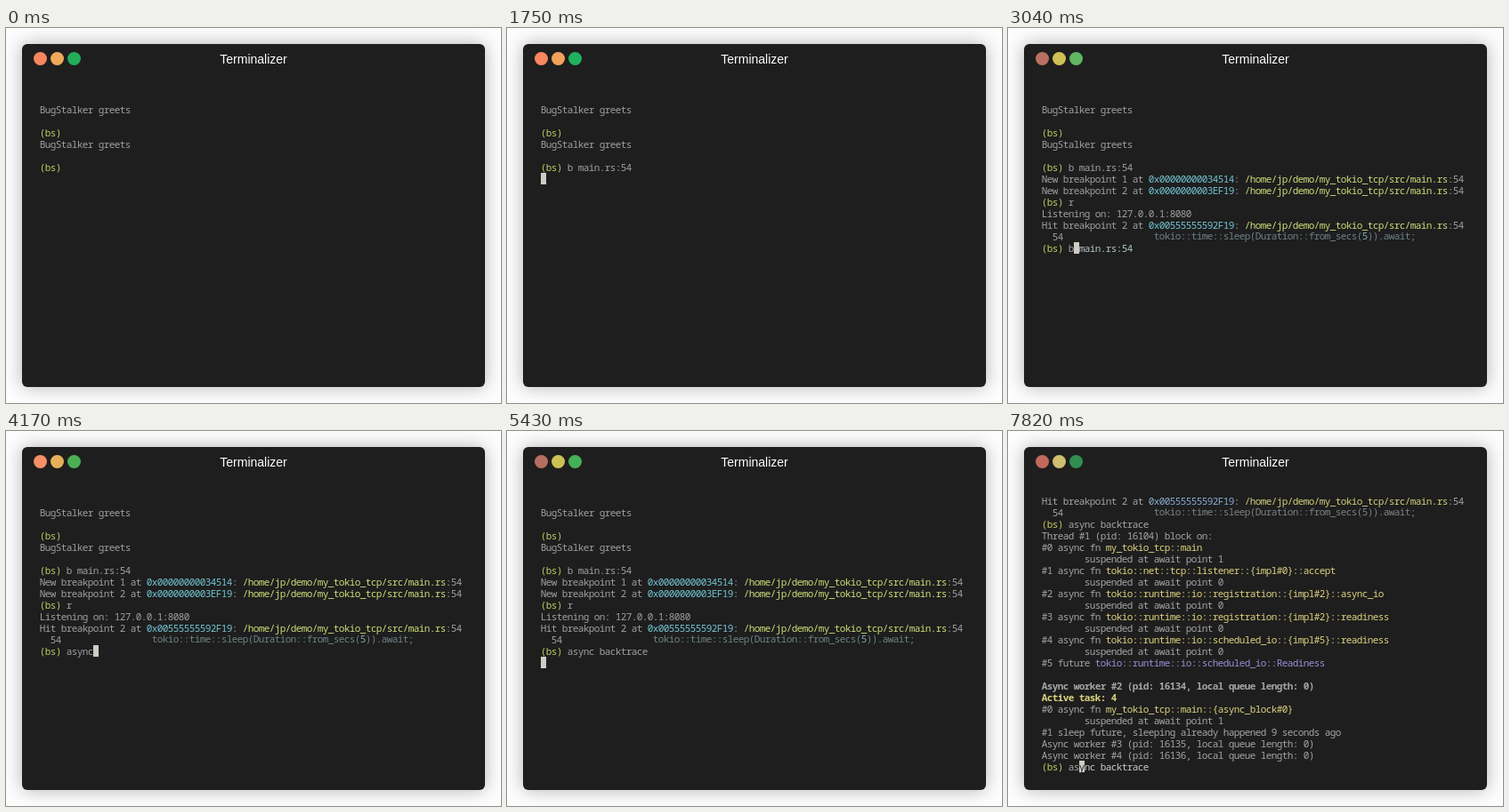
These frames come from a looping animation (556x422 px, 8000 ms). An HTML page with a canvas:

```html
<!DOCTYPE html>
<html lang="en">
<head>
<meta charset="utf-8">
<title>Terminal session</title>
<style>
html, body { margin: 0; width: 100%; height: 100%; overflow: hidden; background: #fdfdfd; }
canvas { display: block; }
</style>
</head>
<body>
<canvas id="stage" width="556" height="422"></canvas>
<script>
const ctx = document.getElementById('stage').getContext('2d');
const LOOP = 8000;
const LEFT = 38, TOP = 72, CELL = 6, LINE = 13, BASE = 11;
const FONT = '11px "Noto Sans Mono", monospace';

// Each segment starts with "|" and a colour key; an upper-case key is bold.
const EARLY = { w: '#a0a0a0', g: '#b9cb60', p: '#cadf78', a: '#72c5d2', c: '#6f8185',
                n: '#83a9b6', h: '#b4c4c6', y: '#dcd27e', m: '#9c8cd4' };
const LATE = { ...EARLY, w: '#a5a5a5', g: '#c1c75f', p: '#d0d07c', a: '#8aaad0',
               c: '#7c8284', n: '#7c8284', h: '#c9c9c6' };

// Start time and colours of the three window buttons.
const BUTTONS = [
  [0, '#f8865f', '#f0a85a', '#22ad58'],
  [1750, '#f8865f', '#f3a25a', '#20b15e'],
  [2500, '#ba7060', '#cfc055', '#60b860'],
  [3620, '#f59068', '#e6b05a', '#4caf52'],
  [5010, '#b46f61', '#cdc155', '#44b254'],
  [5930, '#b76e57', '#d0be70', '#309452'],
  [7820, '#c2695b', '#cfbe70', '#308f50']
];

const PROMPT = '|g(bs)|w ';
const PATH = '|p/home/jp/demo/my_tokio_tcp/src/main.rs|w:54';
const breakpoint = (n, address) => `|wNew breakpoint ${n} at |a${address}|w: ${PATH}`;
const fn = (n, name) => `|w#${n} async fn |y${name}`;
const wait = n => `|w        suspended at await point ${n}`;
const worker = (n, key = 'w') =>
  `|${key}Async worker #${n} (pid: ${16132 + n}, local queue length: 0)`;

const GREETING = ['', '|wBugStalker greets', '', PROMPT, '|wBugStalker greets', ''];
const SET = [...GREETING, PROMPT + 'b main.rs:54'];
const SET_DONE = [...SET, breakpoint(1, '0x00000000034514'), breakpoint(2, '0x0000000003EF19')];
const RUN = [...SET_DONE, PROMPT + 'r'];
const LISTEN = [...RUN, '|wListening on: 127.0.0.1:8080'];
const HIT = [`|wHit breakpoint 2 at |a0x00555555592F19|w: ${PATH}`];
const CODE = [...HIT,
  `|w  54${' '.repeat(17)}|ctokio::time::sleep(Duration::from_secs(|n5|c)).await;`];
const STOPPED = [...LISTEN, ...CODE];
const TRACE = [...CODE,
  PROMPT + 'async backtrace',
  '|wThread #1 (pid: 16104) block on:',
  fn(0, 'my_tokio_tcp::main'), wait(1),
  fn(1, 'tokio::net::tcp::listener::{impl#0}::accept'), wait(0),
  fn(2, 'tokio::runtime::io::registration::{impl#2}::async_io'), wait(0),
  fn(3, 'tokio::runtime::io::registration::{impl#2}::readiness'), wait(0),
  fn(4, 'tokio::runtime::io::scheduled_io::{impl#5}::readiness'), wait(0),
  '|w#5 future |mtokio::runtime::io::scheduled_io::Readiness',
  '',
  worker(2, 'W'),
  '|YActive task: 4',
  fn(0, 'my_tokio_tcp::main::{async_block#0}'), wait(1),
  '|w#1 sleep future, sleeping already happened 9 seconds ago',
  worker(3), worker(4)
];

// Steps: start time, finished lines, typed text (null: no prompt), history hint.
const typing = (lines, keys) => keys.map(([time, typed, hint = '']) => [time, lines, typed, hint]);
const STEPS = [
  ...typing(GREETING, [[0, ''], [260, ''], [370, 'b'], [480, 'b '], [600, 'b m'], [710, 'b ma'],
    [820, 'b mai'], [1020, 'b main'], [1150, 'b main.rs'], [1550, 'b main.rs:54']]),
  [1750, SET, null, ''],
  ...typing(SET_DONE, [[1800, ''], [2000, 'r']]),
  [2050, RUN, null, ''],
  [2100, LISTEN, null, ''],
  [2500, [...LISTEN, ...HIT], null, ''],
  ...typing(STOPPED, [[2540, ''], [3040, 'b', ' main.rs:54'], [3620, ''], [3860, 'a'],
    [4000, 'as'], [4170, 'async'], [4490, 'async '], [4640, 'async b'], [4820, 'async ba'],
    [5010, 'async back'], [5120, 'async backtr'], [5230, 'async backtrace']]),
  [5430, [...STOPPED, PROMPT + 'async backtrace'], null, ''],
  ...typing(TRACE, [[5930, ''], [7660, 'a', 'sync backtrace'], [7820, 'as', 'ync backtrace']])
];

const current = (list, time) => list.findLast(item => item[0] <= time);

function drawWindow(time) {
  ctx.fillStyle = '#fdfdfd';
  ctx.fillRect(0, 0, 556, 422);
  ctx.save();
  ctx.shadowColor = 'rgba(0, 0, 0, 0.3)';
  ctx.shadowBlur = 20;
  ctx.fillStyle = '#1e1e1e';
  ctx.beginPath();
  ctx.roundRect(18, 18, 520, 386, 6);
  ctx.fill();
  ctx.restore();

  current(BUTTONS, time).slice(1).forEach((color, i) => {
    ctx.fillStyle = color;
    ctx.beginPath();
    ctx.arc(38.5 + 19 * i, 34.5, 7.5, 0, 2 * Math.PI);
    ctx.fill();
  });

  ctx.fillStyle = '#fff';
  ctx.font = '14px "Liberation Sans", Arial, sans-serif';
  ctx.fillText('Terminalizer', 278, 40);
}

// Every character is centred in its own terminal cell.
function drawText(text, col, y) {
  [...text].forEach((letter, i) => ctx.fillText(letter, LEFT + (col + i + 0.5) * CELL, y));
}

function drawLine(line, row, colors) {
  let col = 0;
  for (const part of line.split('|').slice(1)) {
    const key = part[0].toLowerCase(), text = part.slice(1);
    const lift = key === 'c' || key === 'n' ? 1 : 0;
    ctx.font = (part[0] === key ? '' : 'bold ') + FONT;
    ctx.fillStyle = colors[key];
    drawText(text, col, TOP + row * LINE + BASE - lift);
    col += text.length;
  }
}

function drawCursor(col, row, letter) {
  const y = TOP + row * LINE;
  ctx.fillStyle = '#cfccc5';
  ctx.fillRect(LEFT + col * CELL, y, CELL, LINE);
  ctx.fillStyle = '#1e1e1e';
  ctx.font = FONT;
  drawText(letter, col, y + BASE);
}

function draw(time) {
  const [, lines, typed, hint] = current(STEPS, time);
  const colors = time < 5930 ? EARLY : LATE;
  const row = lines.length;
  ctx.textAlign = 'center';
  drawWindow(time);
  lines.forEach((line, i) => drawLine(line, i, colors));
  if (typed !== null) drawLine(`${PROMPT}${typed}|h${hint}`, row, colors);
  if (time >= 260) drawCursor(typed === null ? 0 : 5 + typed.length, row, hint.charAt(0));
}

const start = performance.now();
function tick() {
  draw((performance.now() - start) % LOOP);
  requestAnimationFrame(tick);
}
tick();
</script>
</body>
</html>
```
